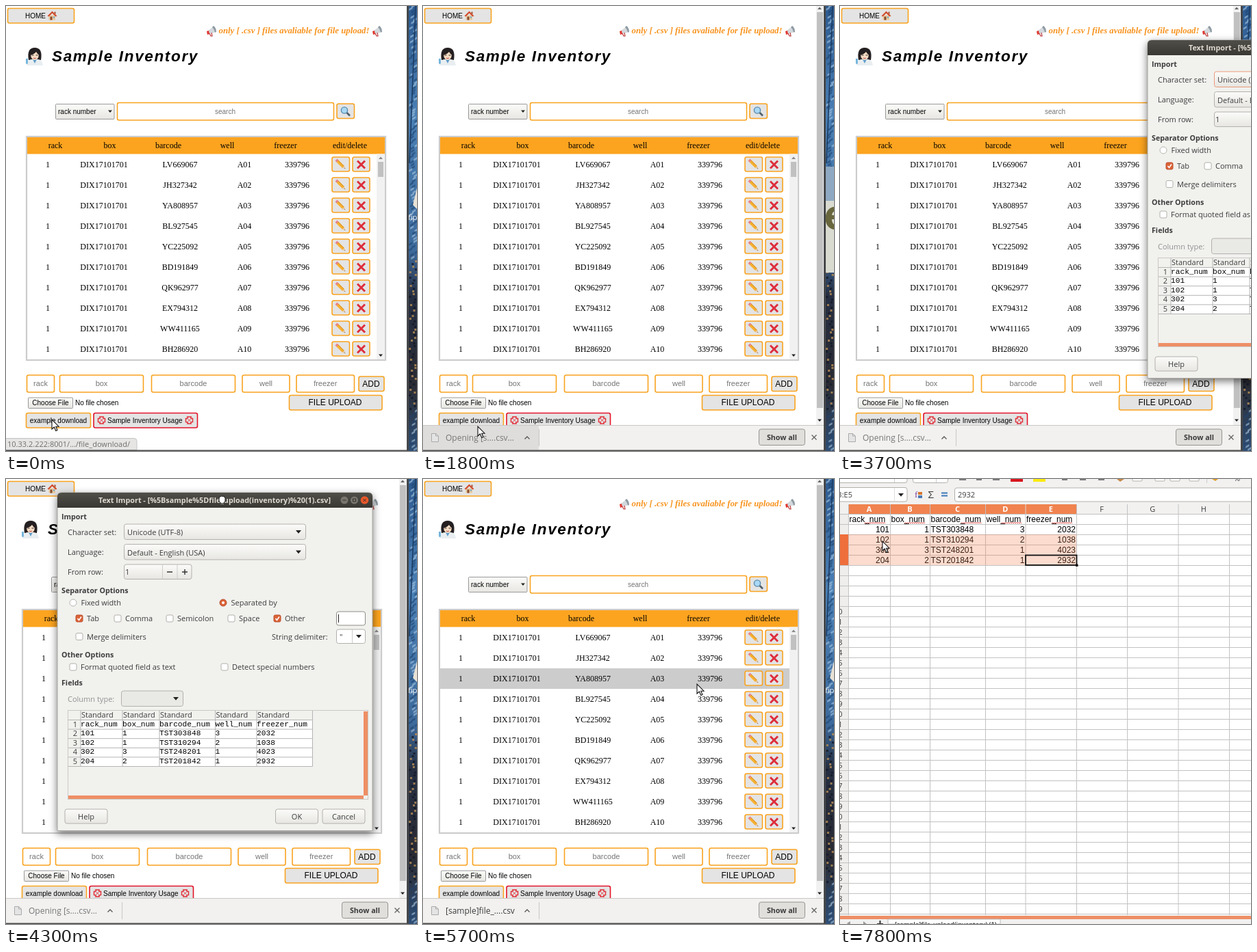
These frames come from a looping animation (600x651 px, 8000 ms). An HTML page:

```html
<!DOCTYPE html>
<html lang="en">
<head>
<meta charset="utf-8">
<title>Sample Inventory</title>
<style>
html, body { margin: 0; width: 100%; height: 100%; overflow: hidden; background: #fff; }
svg { display: block; width: 600px; height: 651px; }
text { white-space: pre; }
.serif { font: 12px 'Liberation Serif', serif; }
.sans { font: 10px 'Liberation Sans', sans-serif; }
.ui { font: 11px 'Open Sans', sans-serif; fill: #3c3c3c; }
.mono { font: 11.2px 'Liberation Mono', monospace; fill: #000; }
.cell { font: 12px 'Liberation Sans', sans-serif; }
.mid { text-anchor: middle; }
.end { text-anchor: end; }
.b { font-weight: 700; font-size: 10.7px; }
.hint { fill: #757575; font-size: 11px; }
.btn { fill: #e4e4e4; stroke: #f9a31f; stroke-width: 1.6; }
.inp { fill: #fff; stroke: #f9a31f; stroke-width: 1.6; }
.box { fill: #fff; stroke: #b3b0ab; }
.push { fill: url(#push); stroke: #b4b1ad; }
</style>
</head>
<body>
<svg id="stage" viewBox="0 0 600 651"></svg>
<script>
const R = (x, y, w, h, fill, a = '') => `<rect x="${x}" y="${y}" width="${w}" height="${h}" fill="${fill}" ${a}/>`;
const B = (cls, x, y, w, h, rx = 2.5, a = '') => `<rect class="${cls}" x="${x}" y="${y}" width="${w}" height="${h}" rx="${rx}" ${a}/>`;
const T = (x, y, s, cls = '', a = '') => `<text x="${x}" y="${y}" class="${cls}" ${a}>${s}</text>`;
const P = (d, fill, a = '') => `<path d="${d}" fill="${fill}" ${a}/>`;
const L = (d, color, w = 1, a = '') => P(d, 'none', `stroke="${color}" stroke-width="${w}" ${a}`);
const C = (x, y, r, fill, a = '') => `<circle cx="${x}" cy="${y}" r="${r}" fill="${fill}" ${a}/>`;
const G = (id, s, a = '') => `<g id="${id}" ${a}>${s}</g>`;
const use = (id, x, y) => `<use href="#${id}" x="${x}" y="${y}"/>`;
const each = (list, fn) => list.map(fn).join('');
const down = (x, y, s = 4, c = '#222') => P(`M${x - s} ${y - s / 2}h${2 * s}l${-s} ${s * 1.2}z`, c);

// small pictograms, each around its own centre
const icons = `<defs>
<linearGradient id="push" x2="0" y2="1"><stop stop-color="#fbfbf9"/><stop offset="1" stop-color="#e7e6e2"/></linearGradient>
<linearGradient id="bar" x2="0" y2="1"><stop stop-color="#504e48"/><stop offset="1" stop-color="#3a3833"/></linearGradient>
<linearGradient id="sky" x2="0" y2="1"><stop stop-color="#2c5a90"/><stop offset=".25" stop-color="#4a80b6"/><stop offset=".55" stop-color="#3d6a9c"/><stop offset=".65" stop-color="#262f42"/><stop offset=".85" stop-color="#2a2b33"/><stop offset="1" stop-color="#2f4f76"/></linearGradient>` +
G('house', P('M-5-1h9.500v7h-9.500z', '#e9c9a0') + P('M-7 0L0-7L7 0L5 1L0-4L-5 1z', '#d2492a') + P('M3-6h2v4l-2-2z', '#a4532f') + P('M-3 1h3v5h-3z', '#8a4b2c') + P('M1.500 1h2v2h-2z', '#5aa5d6')) +
G('horn', P('M-6 1L4-7L7 2L-4 5z', '#d3d8dc') + P('M-7 1l3-1l1 5l-3 1z', '#e0372e') + P('M3-7q4 3 4 9l-2 .5q-1-5-4-7.500z', '#8f9ba3') + L('M-3 4l2 4h2l-1-5', '#b33', 1.2)) +
G('woman', P('M-9 5q-3-18 9-18q12 0 9 18z', '#241f21') + P('M-12 13q1-9 8-9h8q7 0 8 9z', '#e9eef1') + P('M-3 4h6l-3 6z', '#5f9ccb') + `<ellipse cy="-2" rx="5.800" ry="7" fill="#f7dcc4"/>` + P('M-7-2q0-10 7-9q7 0 7 9q-3-1-5-5q-3 4-9 5z', '#241f21') + L('M-4.500-2h3M1.500-2h3', '#333', 1.2) + L('M-2 2q2 1.500 4 0', '#b5484a') + P('M-13 3h3v7q-1.500 2-3 0z', '#76b6dc')) +
G('lens', L('M2 2L6.500 6.500', '#51606b', 2.6) + C(-1.5, -1.5, 4.6, '#a9d8f5', 'stroke="#5a8bad" stroke-width="1.400"')) +
G('pencil', L('M-5-5L4 4', '#f5b031', 4) + L('M-4-6L5 3', '#d98a1f') + L('M-6.500-6.500L-4.500-4.500', '#e8828b', 4) + P('M2.500 5.300L5.300 2.500L7 7z', '#e7c49a') + P('M5.500 6L6 5.500L7 7z', '#333')) +
G('cross', L('M-5.500-5.500L5.500 5.500M5.500-5.500L-5.500 5.500', '#dd2e3c', 2.9)) +
G('anger', L('M-5-2.500q4 0 2.500-2.500h5q-1.500 2.500 2.500 2.500v5q-4 0-2.500 2.500h-5q1.500-2.500-2.500-2.500z', '#e2323c', 1.5) + L('M-2-2l4 4m0-4l-4 4', '#e2323c', .9)) + '</defs>';

// desktop strip: sunlit glass above, lit windows below
let seed = 11;
const rnd = () => (seed = seed * 16807 % 2147483647) / 2147483647;
let wall = R(585, 0, 15, 651, 'url(#sky)');
for (let y = 0; y < 651; y += 4) {
  const night = y > 370 && y < 590;
  const lit = rnd() < .5, x = 588 + rnd() * 9;
  const tone = night ? (lit ? '#b98f55' : '#141a28') : (lit ? '#a9c6e0' : '#1f4470');
  wall += night ? R(x, y, 3, 3, tone, 'opacity=".8"') : P(`M${x} ${y}l5-3v3l-5 3z`, tone, 'opacity=".6"');
}
wall += L('M598 0L589 230', '#1b3a60', 1.5) + P('M600 266l-6 25l6 6z', '#e8e2d6') +
  T(587, 313, 'fip', 'ui', 'style="fill:#fff"') + R(585, 0, 3, 651, '#45474a');
const splash = R(588, 235, 12, 155, '#d9dad0') + R(588, 235, 12, 50, '#8fa9c2') +
  T(585, 327, 'e', '', 'font-family="Open Sans,sans-serif" font-weight="700" font-size="60" fill="#67663c"');

// inventory page
const codes = 'LV669067 JH327342 YA808957 BL927545 YC225092 BD191849 QK962977 EX794312 WW411165 BH286920'.split(' ');
const heads = [['rack', 72], ['box', 151.5], ['barcode', 237], ['well', 323], ['freezer', 408], ['edit/delete', 502]];
const fields = [['rack', 30.5, 40], ['box', 78.5, 122], ['barcode', 212.5, 122], ['well', 345, 69], ['freezer', 424, 84.5]];
const row = (code, i) => {
  const y = 235.5 + 30 * i;
  const cells = [['1', 61], ['DIX17101701', 143], [code, 254], ['A' + String(i + 1).padStart(2, 0), 348], ['339796', 425]];
  return each(cells, ([s, x]) => T(x, y, s, 'serif mid')) +
    B('btn', 476, y - 14.5, 25.5, 21) + B('btn', 506, y - 14.5, 25, 21) + use('pencil', 488.5, y - 4) + use('cross', 518.5, y - 3.5);
};
const page = use('horn', 300, 36) + use('horn', 542, 36) +
  T(310.5, 40, 'only [ .csv ] files avaliable for file upload!', '', `font-family="Liberation Serif,serif" font-size="12.800" font-weight="700" font-style="italic" fill="#f7931e"`) +
  use('woman', 42, 74) +
  T(67, 81, 'Sample Inventory', '', `font-family="Liberation Sans,sans-serif" font-size="22.500" font-weight="700" font-style="italic" letter-spacing="1.650"`) +
  B('push', 72.5, 143.5, 85.5, 22, 1, 'style="stroke:#999"') + T(76, 158, 'rack number', 'sans') + down(152, 154, 3) +
  B('inp', 162.5, 141.5, 316, 25.5) + T(320, 158, 'search', 'sans mid', 'fill="#757575"') +
  B('btn', 483, 143, 25.5, 21.5) + use('lens', 495.5, 154) +
  R(30, 191, 524, 327, '#fff', 'stroke="#ccc" stroke-width="2.200"') + R(31, 192, 522, 24.5, '#fca41f') +
  each(heads, ([s, x]) => T(x, 208, s, 'serif mid')) +
  `<rect id="hover" x="31" width="510" height="30" fill="#ccc"/>` + each(codes, row) +
  R(541, 216.500, 12, 300.500, '#f1f1f1') + R(543, 228, 8, 22, '#c1c1c1') + P('M544 224h6l-3-3.500z', '#888') + down(547, 511, 3) +
  each(fields, ([s, x, w]) => B('inp', x, 540, w, 25) + T(x + w / 2, 556, s, 'sans mid hint')) +
  B('btn', 515, 542, 37, 21.5) + T(533, 556.5, 'ADD', 'sans mid', 'style="font-size:12px"') +
  B('push', 32.5, 573, 65, 15.5, 1, 'style="stroke:#999"') + T(65, 584, 'Choose File', 'sans mid') + T(101, 584, 'No file chosen', 'sans') +
  B('btn', 413.5, 569.5, 135.5, 21.5) + T(480.5, 584, 'FILE UPLOAD', 'sans mid', 'style="font-size:12px"') +
  B('btn', 29.5, 595.5, 94, 21.5) + T(76.5, 609.5, 'example download', 'sans mid') +
  B('btn', 128, 595.5, 151.5, 21.5, 2.5, 'style="stroke:#e3142a"') + T(148, 609.5, 'Sample Inventory Usage', 'sans') +
  use('anger', 139.5, 606) + use('anger', 267.5, 606);
const home = B('btn', 2.5, 3.5, 97, 21.5) + T(28, 18, 'HOME', 'sans') + use('house', 67.5, 14.5);
const scroll = R(574, 0, 11, 613, '#f1f1f1') + R(575, 9, 9, 579, '#c1c1c1') + P('M576 5h6l-3-3.500z', '#666') + down(579, 606, 3);
const status = P('M-1 649.500V632.500H187q4 0 4 4V649.500z', '#e6e5e4', 'stroke="#c4c4c4"') + T(181, 645, '10.33.2.222:8001/…/file_download/', 'ui end', 'style="fill:#6e6e6e"');
const shelf = R(0, 613, 585, 37, '#f2f1f0') + `<rect id="itemHover" y="613" width="169" height="36.500" fill="#dfdddb"/>` +
  L('M0 613.500H585', '#c9c7c4') + L('M169.500 619V644', '#c9c7c4') +
  P('M12.500 625.500h6l4 3.500v8.500h-10z', '#e4e4e4', 'stroke="#aaa"') + L('M18.500 625.500v3.500h4', '#aaa') +
  `<text id="item" x="33" y="636" class="ui" style="font-size:12px"></text>` + L('M148.500 633.500l3.500-3.500l3.500 3.500', '#555', 1.3) +
  B('push', 490.5, 619, 67, 23.5, 3, 'style="fill:#e0dfdc;stroke:#96948f"') + T(524, 634.5, 'Show all', 'ui mid b') + L('M567.500 627.500l7 7m0-7l-7 7', '#666', 1.4);

// import dialog
const label = (x, y, s) => T(x, y, s, 'ui');
const title = (y, s) => T(81, y, s, 'ui b');
const check = (x, y, s, on) => B('box', x - 5, y - 5, 10, 10, 2, on ? 'style="fill:#dc6238;stroke:#b9502c"' : '') +
  (on ? L(`M${x - 2.5} ${y}l2 2.500l3.500-5`, '#fff', 1.6) : '') + label(x + 11, y + 4.2, s);
const radio = (x, s, on) => C(x, 181, 5, on ? '#dc6238' : '#fff', `stroke="${on ? '#b9502c' : '#b9b6b2'}"`) + (on ? C(x, 181, 2, '#fff') : '') + label(x + 11.5, 185, s);
const combo = (x, y, w, s, a = '') => B('push', x + .5, y, w, 22.5, 3, a) + label(x + 5, y + 16, s) + down(x + w - 10, y + 11);
const push = (x, s, a = '') => B('push', x, 483, 62, 21, 3, a) + T(x + 31, 497.5, s, 'ui mid');
const data = [
  ['rack_num', 'box_num', 'barcode_num', 'well_num', 'freezer_num'],
  ['101', '1', 'TST303848', '3', '2032'],
  ['102', '1', 'TST310294', '2', '1038'],
  ['302', '3', 'TST248201', '1', '4023'],
  ['204', '2', 'TST201842', '1', '2932']];
const gx = [109, 170, 224, 305.5, 366, 447.5];
const preview = R(90.5, 338.5, 438, 130, '#f1f1ee', 'stroke="#ccc9c6"') + R(109, 352, 338.5, 68, '#fff') +
  each(gx, x => L(`M${x} 339V420.500`, '#b5b5b5')) +
  each(data, (r, i) => L(`M91 ${352.5 + 13.6 * i}H447.500`, '#b5b5b5') + T(104, 362.5 + 13.6 * i, i + 1, 'ui end') +
    each(r, (s, c) => T(gx[c], 361.5 + 13.6 * i, s, 'mono'))) +
  L('M91 420.500H447.500', '#b5b5b5') + each(gx.slice(0, 5), x => T(x + 1, 349, 'Standard', 'ui')) +
  R(91, 463, 431, 5, '#ee8f66') + R(522, 340, 6, 123, '#ee8f66');
const dialog = P('M75 514.500V26q0-6 6-6H529q6 0 6 6V514.500z', '#f1f1ee', 'id="frame" stroke="#a8a5a0"') +
  P('M75 42V26q0-6 6-6H529q6 0 6 6V42z', 'url(#bar)') +
  T(304.5, 34.5, 'Text Import - [%5Bsample%5Dfile_upload(inventory)%20(1).csv]', 'ui mid b', 'style="font-size:10.8px;fill:#dfdbd2"') +
  C(494, 31, 5.5, '#77756d') + C(508.5, 31, 5.5, '#77756d') + C(523.5, 31, 5.8, '#e9582a') +
  L('M491.500 31h5M506.500 29h4v4h-4zM521.500 29l4 4m0-4l-4 4', '#33312d') +
  title(59, 'Import') + label(90, 82, 'Character set:') + combo(172, 66, 265, 'Unicode (UTF-8)', 'id="focus"') +
  label(90, 111, 'Language:') + combo(172, 95.5, 265, 'Default - English (USA)') +
  label(90, 139.5, 'From row:') + B('push', 172.5, 125, 98.5, 21.5, 3) + label(174, 139.5, '1') +
  L('M228.500 125v21.500M250 125v21.500', '#ccc') + L('M235 136h8M257 136h8M261 132v8', '#333', 1.4) +
  title(167, 'Separator Options') + radio(98, 'Fixed width') + radio(317, 'Separated by', 1) +
  check(107, 204, 'Tab', 1) + check(163, 204, 'Comma') + check(239, 204, 'Semicolon') + check(329, 204, 'Space') + check(396, 204, 'Other', 1) +
  B('box', 482.5, 194, 42, 20, 3, 'style="stroke:#8f8c87"') + L('M485.500 198v12', '#222') +
  check(107, 230.5, 'Merge delimiters') + label(388, 234.5, 'String delimiter:') + B('box', 482.5, 220, 42, 20.5, 3) + label(487, 235, '"') + L('M505.500 220v20', '#ccc') + down(515, 230) +
  title(261, 'Other Options') + check(98, 275, 'Format quoted field as text') + check(319, 275, 'Detect special numbers') +
  title(302, 'Fields') + T(90, 325.5, 'Column type:', 'ui', 'style="fill:#929292"') + combo(168, 310, 90, '', 'style="fill:#e9e9e6"') +
  preview + push(86, 'Help') + push(393.5, 'OK', 'id="ok"') + push(462, 'Cancel');

// spreadsheet
const cx = [12, 73, 131, 212, 270.5, 345, 419, 493.5, 568, 643];
const squiggle = x => L(`M${x - 30} 65` + 'l1.500-1.500l1.500 1.500'.repeat(10), '#e0322c', .9);
const ends = [66, 124, 206.5, 265, 339];
const sheet = R(0, 0, 600, 651, '#fff') + R(0, 0, 600, 51, '#f2f1f0') +
  B('box', -5, -10, 103, 15.5, 3) + B('box', 106.5, -10, 51, 15.5, 3) + L('M79.500 0v5M140.500 0v5', '#ccc') +
  R(249, 0, 18, 4, '#d8141c') + R(282, 0, 18, 4, '#fbea0c') +
  L('M174 1h10M199 1h8M223 1h10M324 1h8M350 1h9M377 1h9', '#555', 1.6) + P('M404 0h11l-6 4z', '#c58a4a') +
  each([427, 460, 482, 510], x => B('box', x, -6, 14, 9, 1)) + P('M543 0h9l-4 3z', '#e0a02c') + T(575, 3, '%', 'ui') + L('M535.500 0v6', '#ccc') +
  B('box', -5, 12.5, 103, 20.5, 3) + L('M79.500 13v20', '#ddd') + down(89, 23) +
  T(109, 27, 'f', 'serif', 'font-style="italic" style="font-size:13px" fill="#7a3fa0"') + R(114, 19, 6, 4, '#d9762c') + R(114, 24, 6, 4, '#4a7ab5') +
  T(128.500, 28, 'Σ', 'ui', 'style="font-size:15px"') + L('M148 20.500h9M148 24.500h9', '#3b78b8', 2) +
  B('box', 167.5, 13, 440, 20, 3) + R(0, 51, 12, 588, '#efeeec') +
  each([...Array(40).keys()], i => L(`M0 ${51.5 + 15 * i}H600`, '#c2c2c2') + (i > 8 ? T(3.5, 63 + 15 * i, i + 1, 'ui end') : '')) +
  each(cx, x => L(`M${x + .5} 37V638`, '#c2c2c2')) +
  each(data, (r, i) => each(r, (s, c) => i && c != 2 ? T(cx[c + 1] - 1, 78 + 15 * (i - 1), s, 'cell end') : T(cx[c] + 1.5, 63 + 15 * i, s, 'cell'))) +
  each(ends, squiggle) + G('select', '') +
  R(0, 638, 600, 13, '#f2f1f0') + R(0, 639, 600, 5, '#ee8f66') + R(70, 644, 164, 7, '#fff', 'stroke="#bbb"') +
  T(80, 655, '[sample]file_upload(inventory) (1)', 'ui', 'style="font-size:9.2px;font-weight:600"') +
  P('M15 647v6l-5-3zM34 647l5 4h-5z', '#999') + L('M54 651h9M58.500 646v5', '#333', 2);

const arrow = P('M0 0V14L3.300 11L5.800 16.500L8 15.500L5.700 10.200H10z', '#fff', 'stroke="#111" stroke-width="1.100"');
const hand = P('M-4-1q0-4 2-3q1-2 2.500-.5q2-1 2.500 .5q2 0 2 2v4q-1 4-4.500 4q-3 0-4.500-4z', '#fff', 'stroke="#111"');

const stage = document.getElementById('stage');
stage.innerHTML = icons + wall + G('splash', splash) + R(0, 0, 585, 651, '#fff') + G('page', page) + home +
  G('scroll', scroll) + G('status', status) + G('shelf', shelf) + R(0, 649.5, 588, 1.5, '#4a4a4a') +
  G('dialog', dialog) + G('sheet', sheet) + G('arrow', arrow) + G('hand', hand);
const $ = id => document.getElementById(id);
const show = (id, on) => $(id).setAttribute('visibility', on ? 'visible' : 'hidden');
const move = (id, x, y) => $(id).setAttribute('transform', `translate(${x} ${y})`);
const fade = (id, v) => { show(id, v > 0); $(id).setAttribute('opacity', v); };

const track = (keys, t) => {
  const i = keys.findIndex(k => k[0] > t);
  if (i < 1) return keys.at(i).slice(1);
  const [a, b] = [keys[i - 1], keys[i]], f = (t - a[0]) / (b[0] - a[0]);
  return a.slice(1).map((v, j) => v + (b[j + 1] - v) * f);
};
const pointer = [[0, 67, 605], [1000, 67, 605], [1400, 80, 615], [1900, 80, 615], [2700, 288, 120], [3400, 288, 120], [3700, 612, 64],
  [4000, 689, 60], [4300, 315, 30], [4500, 318, 28], [4900, 425, 485], [5200, 425, 485], [5700, 400, 300], [5900, 400, 300],
  [6300, 386, 112], [6700, 386, 112], [6900, 340, 121], [7000, 338, 121], [7600, 62, 91]];
const dialogPath = [[0, 374, 30], [4000, 374, 30], [4300, 0, 0], [4500, 3, -2]];
const dialogFade = [[3000, 0], [3200, 1], [5100, 1], [5200, .975], [5400, 0]];

function drawSelection(t, x, y) {
  const drag = t >= 6900;
  const c1 = drag ? 4 : 0, r1 = drag ? 4 : 0;
  const c0 = drag ? Math.min(4, cx.findIndex(v => v > x) - 1) : 0;
  const r0 = drag ? Math.min(4, Math.floor((y - 51) / 15)) : 0;
  const many = c0 < c1 || r0 < r1;
  let s = T(172, 27, data[r1][c1], 'ui') + R(0, 51 + 15 * r0, 12, 15 * (r1 - r0 + 1), '#ee6f3b');
  for (let c = 0; c < 9; c++) {
    const on = c >= c0 && c <= c1, mid = (cx[c] + cx[c + 1]) / 2;
    if (on) s += R(cx[c] + 1, 37, cx[c + 1] - cx[c] - 1, 14, many ? '#f0834f' : '#ee6f3b');
    s += T(mid, 47.5, 'ABCDEFGHI'[c], 'ui mid', on ? 'style="fill:#fff;font-weight:700"' : '');
  }
  if (many) s += T(18, 27, 'ABCDE'[c0] + (r0 + 1) + ':E5', 'ui end') +
    R(cx[c0], 51 + 15 * r0, cx[5] - cx[c0], 15 * (5 - r0), '#f07746', 'opacity=".26"');
  const bx = cx[c1], by = 51 + 15 * r1, w = cx[c1 + 1] - bx;
  $('select').innerHTML = s + R(bx + .5, by + .5, w, 14.5, 'none', 'stroke="#111" stroke-width="1.800"') + R(bx + w - 1, by + 13.5, 3.5, 3.5, '#111');
}

function draw(now) {
  const t = Math.floor(now % 8000 / 100) * 100;
  const [x, y] = track(pointer, t);
  const [dx, dy] = track(dialogPath, t);
  const saved = t >= 400, opening = t >= 1500 && t < 4600;
  move('page', saved ? -6 : 0, 0);
  show('scroll', saved);
  show('status', !saved);
  show('shelf', saved);
  move('shelf', 0, Math.max(0, 36 * (1 - (t - 300) / 400)));
  show('itemHover', t >= 1400 && t < 1900);
  $('item').textContent = opening ? 'Opening [s….csv…' : '[sample]file_….csv';
  $('item').style.fill = opening ? '#777' : '#3c3c3c';
  show('splash', t >= 1700 && t < 2200);

  const line = Math.floor((y - 217) / 30);
  show('hover', line >= 0 && line < 10 && x < 536 && (t < 3000 || t >= 5200) && t < 6000);
  $('hover').setAttribute('y', 217 + 30 * line);

  move('dialog', dx, dy);
  fade('dialog', track(dialogFade, t)[0]);
  $('frame').style.filter = t < 5200 ? 'drop-shadow(0 4px 6px #0008)' : 'drop-shadow(0 1px 2px #0005)';
  $('focus').style.stroke = t < 4100 || t >= 5000 ? '#ea9a78' : '#b4b1ad';
  $('ok').style.fill = t >= 4900 ? '#dddcd8' : '';

  fade('sheet', t < 5900 ? 0 : t < 6000 ? .6 : 1);
  drawSelection(t, x, y);
  const grab = t >= 4000 && t < 4600;
  show('arrow', !grab);
  show('hand', grab);
  move('arrow', x, y);
  move('hand', x, y);
  requestAnimationFrame(() => draw(performance.now()));
}
draw(0);
</script>
</body>
</html>
```
